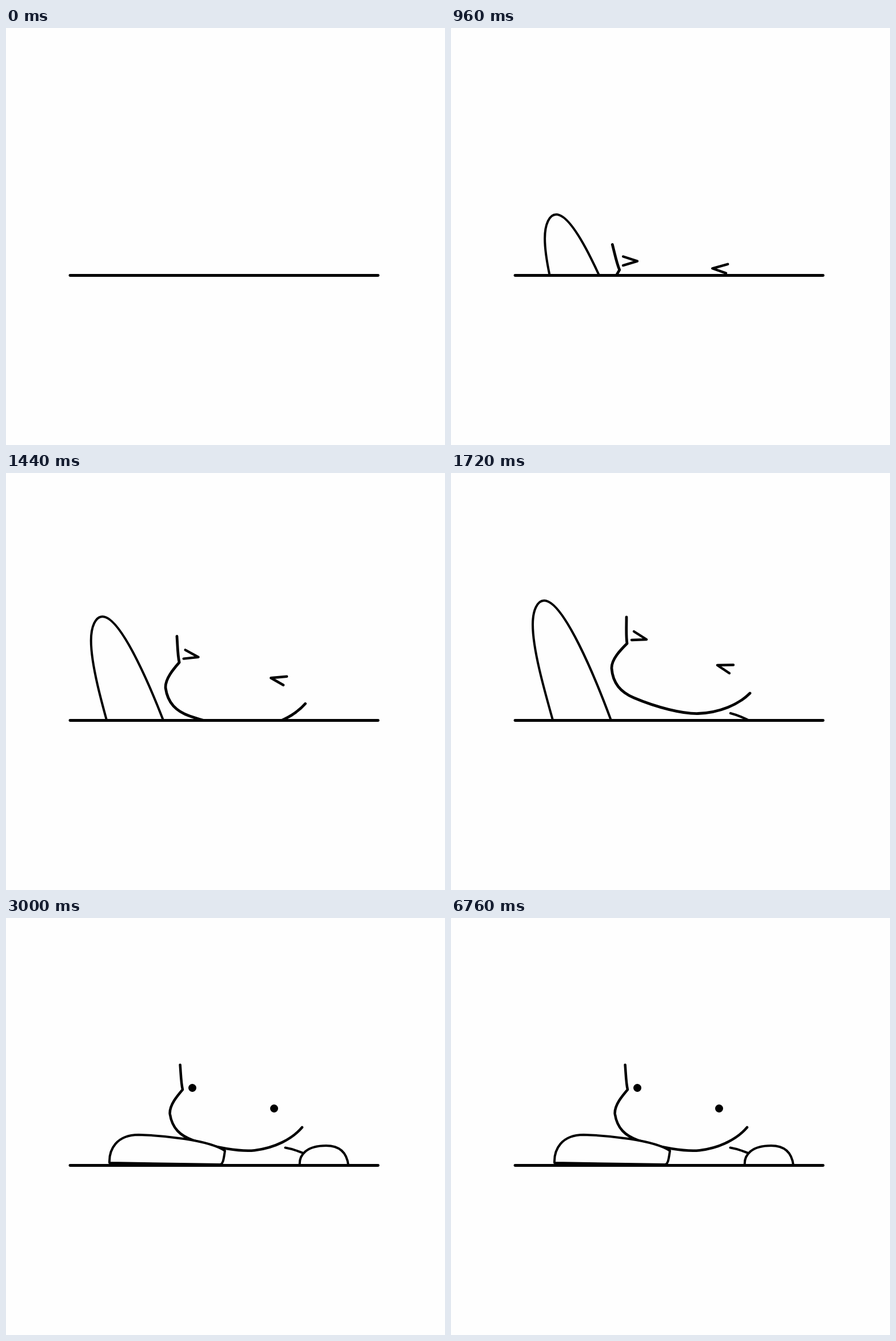
Recreate the animation shown at these times as an HTML page. Size 768 by 729 pixels, loop 8000 ms.

```html
<!DOCTYPE html>
<html lang="en">
<head>
<meta charset="utf-8">
<title>Peeking over the edge</title>
<style>
  html, body { margin: 0; width: 100%; height: 100%; overflow: hidden; background: #fefefe; }
  svg { display: block; width: 100vw; height: 100vh; }
  path { fill: none; stroke: #000; stroke-linecap: round; stroke-linejoin: round; }
  #head path { stroke-width: 4.8; }
  #head #squint { stroke-width: 4.4; }
  #arm, #paw { fill: #fefefe; stroke-width: 4; }
</style>
</head>
<body>
<svg viewBox="0 0 768 729">
  <clipPath id="above"><rect width="768" height="432"/></clipPath>
  <g clip-path="url(#above)">
    <g id="head">
      <path d="M-1-46C-1-28-2-13 0 0C-11 11-27 27-27 43C-25 70-11 85 12 95C52 112 97 123 124 122.500C162 121 195 107 215 87"/>
      <path style="stroke-width:4.200" d="M181 122Q197 126 218 137"/>
      <path id="squint" d="M12-21L34-7L8-6M186 37.500L158 38L179 52"/>
      <g id="open">
        <circle cx="18.200" cy="-1.800" r="7.400"/>
        <circle cx="166.100" cy="48.100" r="7.400"/>
      </g>
      <g id="shut">
        <ellipse rx="10" ry="3.100" transform="translate(21.600 -4.100) rotate(12)"/>
        <ellipse rx="10" ry="3.100" transform="translate(166.300 50.800) rotate(12)"/>
      </g>
    </g>
    <path id="paw" d="M514 433C512 414 526 398 560 398C588 398 597 415 599 433"/>
    <path id="arm"/>
  </g>
  <path d="M112 432.500H651" stroke-width="4.800"/>
</svg>
<script>
const LOOP = 8000, STEP = 40, SLAP = 1960, REST = 2200;
const BLINKS = [[2680, 3000], [6440, 6760]];
const RAISED = [[182, 446], [164, 382], [143, 310], [143, 265], [143, 240],
                [151, 223], [163, 223], [196, 223], [251, 352], [285, 446]];
const FLAT = [[181, 428], [180, 405], [193, 379], [232, 379], [275, 380],
              [355, 388], [383, 407], [381, 420], [380, 431], [374, 431]];

const $ = id => document.getElementById(id);
const [head, arm, paw, squint, open, shut] =
  ['head', 'arm', 'paw', 'squint', 'open', 'shut'].map($);
const ramp = (t, a, b) => Math.min(1, Math.max(0, (t - a) / (b - a)));
const mix = (a, b, p) => a + (b - a) * p;
const show = (el, on) => el.style.display = on ? '' : 'none';

// How far the body still sits below its nearly raised pose
const depth = t => 114.7 * (1 + Math.cos(Math.PI * ramp(t, -100, 2000))) - 9.9;

function drawArm(d, lift, p) {
  const swing = Math.sin(Math.PI * p);
  const pts = RAISED.map(([x, y], i) => {
    const tip = i > 2 && i < 9 ? swing : 0;
    return [mix(x + .205 * d - 2.5 * lift, FLAT[i][0], p) + 30 * tip,
            mix(y + d - 3 * lift, FLAT[i][1], p) - 25 * tip]
      .map(v => v.toFixed(2)).join(' ');
  });
  arm.setAttribute('d', `M${pts[0]}C${pts.slice(1).join(' ')}${p ? 'Z' : ''}`);
}

function drawHead(d, p) {
  const x = mix(308 - .19 * d + .0006 * d * d, 309, p);
  const y = mix(298 + 1.17 * d + .0004 * d * d, 300, p);
  head.setAttribute('transform',
    `translate(${x} ${y}) rotate(${mix(-.14 * d, -4.5, p)}) scale(${mix(1, .945, p)})`);
}

function render(t) {
  const d = depth(Math.min(t, SLAP));
  const u = ramp(t, SLAP, REST);
  drawArm(d, ramp(t, 1800, SLAP), u * u);
  drawHead(d, u * u * (3 - 2 * u));
  paw.setAttribute('transform', `translate(0 ${40 * (1 - u)})`);

  const awake = t >= 2080;
  const blink = BLINKS.some(([a, b]) => t >= a && t < b);
  show(squint, !awake);
  show(open, awake && !blink);
  show(shut, blink);
}

const start = performance.now();
function tick() {
  const t = (performance.now() - start) % LOOP;
  render(Math.floor(t / STEP) * STEP);
  requestAnimationFrame(tick);
}
tick();
</script>
</body>
</html>
```
